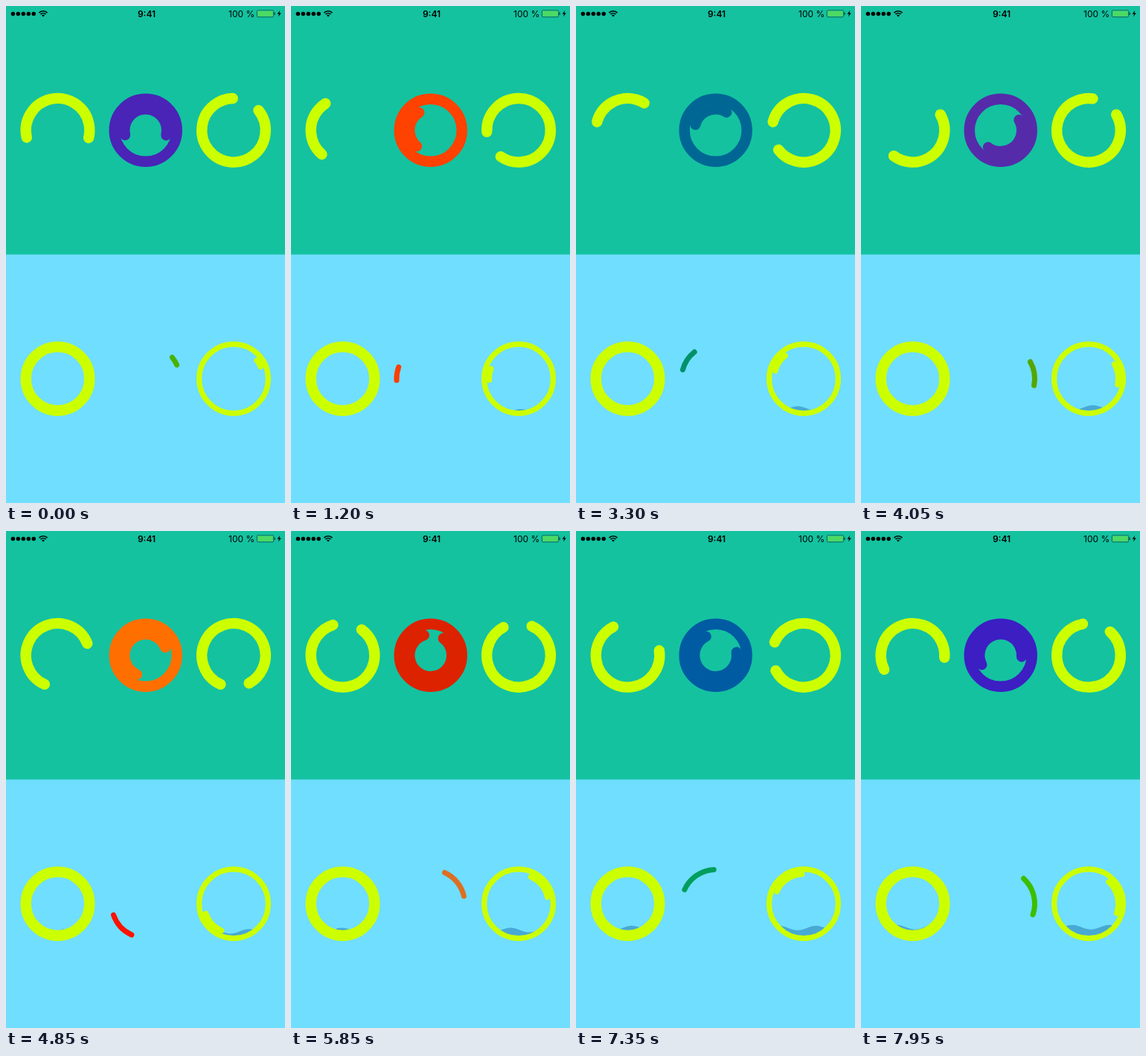
An HTML page with a canvas for the animation above (8000 ms loop, 375 by 667 pixels).

```html
<!DOCTYPE html>
<html lang="en">
<head>
<meta charset="utf-8">
<title>Progress rings</title>
<style>
  html, body { margin: 0; width: 100%; height: 100%; overflow: hidden; background: #70deff; }
  canvas { display: block; width: 375px; height: 667px; }
</style>
</head>
<body>
<canvas id="stage"></canvas>
<script>
const W = 375, H = 667, LOOP = 8000, STEP = 50;
const TOP = '#14c2a0', BOTTOM = '#70deff', YELLOW = '#ccff00', WATER = '#48a9d4';
const LEFT = 69.5, MID = 187.7, RIGHT = 306, ROW1 = 166.8, ROW2 = 500.2;
const TAU = Math.PI * 2;
const RED = [255, 0, 0], ORANGE = [255, 128, 0], GREEN = [0, 249, 0], BLUE = [0, 0, 255];
const WARM = [BLUE, ORANGE, RED, GREEN], COOL = [GREEN, RED, ORANGE, BLUE];

const canvas = document.getElementById('stage');
const ctx = canvas.getContext('2d');
const ratio = window.devicePixelRatio || 1;
canvas.width = W * ratio;
canvas.height = H * ratio;
ctx.scale(ratio, ratio);

const rad = deg => deg * Math.PI / 180;

// Angles in degrees, clockwise from three o'clock.
function arc(x, y, r, width, color, from = 0, to = 360) {
  ctx.beginPath();
  ctx.arc(x, y, r, rad(from), rad(to));
  ctx.strokeStyle = color;
  ctx.lineWidth = width;
  ctx.lineCap = 'round';
  ctx.stroke();
}

function dot(x, y, r, color) {
  ctx.beginPath();
  ctx.arc(x, y, r, 0, TAU);
  ctx.fillStyle = color;
  ctx.fill();
}

// One second per color, blended linearly.
function cycle(colors, s) {
  const i = Math.floor(s), k = s - i, n = colors.length;
  const a = colors[i % n], b = colors[(i + 1) % n];
  return `rgb(${a.map((v, j) => Math.round(v + (b[j] - v) * k)).join(',')})`;
}

// Four seconds growing, four seconds shrinking.
function spinner(s) {
  const p = (s + 6) % 8;
  if (p < 4) return [0, 60 + 246 * (1 - Math.cos(p / 4 * Math.PI / 2))];
  const x = p / 4 - 1;
  return [360 * x, 306 + 114 * (1 - Math.pow(1 - x, 3.2))];
}

function water(cx, cy, r, level, crest) {
  ctx.save();
  ctx.beginPath();
  ctx.arc(cx, cy, r, 0, TAU);
  ctx.clip();
  ctx.beginPath();
  ctx.moveTo(cx - 50, cy + 50);
  for (let x = cx - 50; x <= cx + 50; x++) {
    ctx.lineTo(x, level - 3 * Math.cos((x - crest) / 50 * TAU));
  }
  ctx.lineTo(cx + 50, cy + 50);
  ctx.fillStyle = WATER;
  ctx.fill();
  ctx.restore();
}

function statusBar() {
  for (let i = 0; i < 5; i++) dot(9.4 + i * 6.95, 10.4, 2.75, '#000');

  for (const r of [2, 4.9, 7.8]) {
    ctx.beginPath();
    if (r === 2) {
      ctx.moveTo(50, 14.6);
      ctx.arc(50, 14.6, 2.8, rad(225), rad(315));
      ctx.fillStyle = '#000';
      ctx.fill();
    } else {
      ctx.arc(50, 14.6, r, rad(225), rad(315));
      ctx.strokeStyle = '#000';
      ctx.lineWidth = 1.6;
      ctx.lineCap = 'butt';
      ctx.stroke();
    }
  }

  ctx.fillStyle = '#000';
  ctx.textBaseline = 'alphabetic';
  ctx.textAlign = 'center';
  ctx.font = '600 12px Inter, sans-serif';
  ctx.fillText('9:41', 189, 14.6);
  ctx.textAlign = 'right';
  ctx.font = '400 12px Inter, sans-serif';
  ctx.fillText('100 %', 334.3, 14.6);

  ctx.strokeStyle = '#10302a';
  ctx.lineWidth = 0.6;
  ctx.beginPath();
  ctx.roundRect(337.3, 5.8, 22.4, 9, 1.5);
  ctx.stroke();
  ctx.fillStyle = '#4cd964';
  ctx.fillRect(338.2, 6.7, 20.6, 7.2);
  ctx.fillStyle = '#10302a';
  ctx.fillRect(360.4, 8.7, 1.2, 3.2);

  ctx.fillStyle = '#000';
  ctx.beginPath();
  ctx.moveTo(368.3, 6);
  ctx.lineTo(364.6, 10.8);
  ctx.lineTo(367, 10.8);
  ctx.lineTo(366, 14.4);
  ctx.lineTo(369.8, 9.4);
  ctx.lineTo(367.4, 9.4);
  ctx.fill();
}

function draw(ms) {
  const t = ms / 1000;
  const s = t + 0.285;                 // time since the spinners started
  const base = -90 + 180 * s;          // shared rotation, two seconds a turn
  const grown = 6.5 * (t + 2.285);     // progress in degrees
  const level = ROW2 + 50 - grown / 360 * 100;
  const [from, to] = spinner(s);

  ctx.fillStyle = BOTTOM;
  ctx.fillRect(0, 0, W, H);
  ctx.fillStyle = TOP;
  ctx.fillRect(0, 0, W, 333.5);
  statusBar();

  arc(LEFT, ROW1, 42.8, 14.4, YELLOW, base + from, base + to);

  const warm = cycle(WARM, s);
  arc(MID, ROW1, 42, 14.4, warm);
  arc(MID, ROW1, 28.3, 14, warm, base + from, base + to);

  arc(RIGHT, ROW1, 42.8, 14.4, YELLOW, base, base + 307);

  water(LEFT, ROW2, 43, level, 54 + 38 * (t - 6.8));
  arc(LEFT, ROW2, 42.8, 14.4, YELLOW);

  arc(MID, ROW2, 45.8, 7, cycle(COOL, s), base, base + grown);

  water(RIGHT, ROW2, 47, level, 286.8 + 18.5 * t);
  arc(RIGHT, ROW2, 46.4, 7.2, YELLOW);
  arc(RIGHT, ROW2, 39.6, 7.2, YELLOW, base, base + grown);
}

const start = performance.now();
function tick() {
  const ms = (performance.now() - start) % LOOP;
  draw(Math.floor(ms / STEP) * STEP);
  requestAnimationFrame(tick);
}
tick();
</script>
</body>
</html>
```
